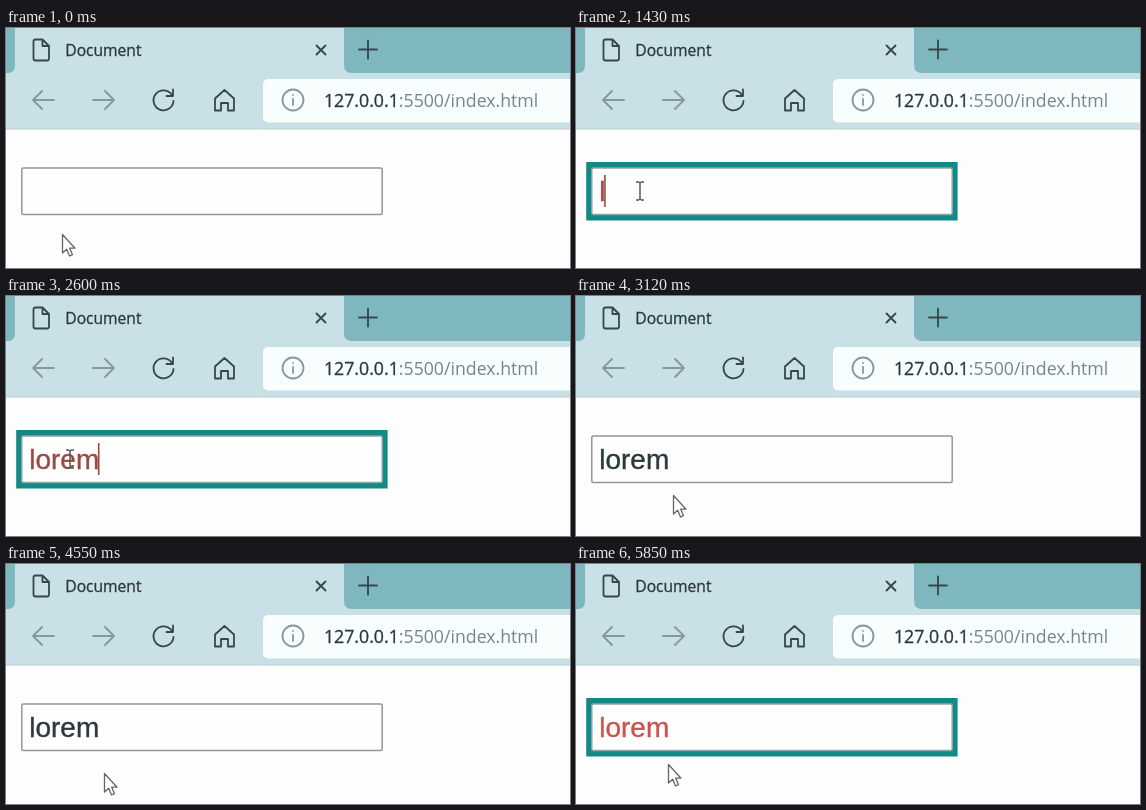
An HTML page that plays this animation: 564x240 px, repeating every 5980 ms.

```html
<!DOCTYPE html>
<html lang="en">
<head>
<meta charset="utf-8">
<style>
  html, body { margin: 0; width: 100%; height: 100%; overflow: hidden; background: #fdfdfe; }
  svg { display: block; }
  text { font-family: "Open Sans", "Noto Sans", sans-serif; white-space: pre; }
  .icon { fill: none; stroke: #34474c; stroke-width: 1.8; stroke-linecap: round; stroke-linejoin: round; }
  .dim { stroke: #87989d; }
  .ink { fill: #29383c; stroke: #29383c; stroke-width: .3; }
  #word { font: 28px "Liberation Sans", Arial, sans-serif; stroke-width: .4; }
</style>
</head>
<body>
<svg width="564" height="240" viewBox="0 0 564 240">
  <!-- tab strip and toolbar -->
  <rect width="564" height="101" fill="#c8e0e6"/>
  <path d="M0 0H9V37Q9 45 2 45H0Z M338 0H564V45H346Q338 45 338 37Z" fill="#7fb7bf"/>
  <path d="M0 101H564" stroke="#bccbd0"/>
  <rect x="257" y="51" width="330" height="43.500" rx="5" fill="#f8fdfe"/>

  <!-- tab -->
  <path class="icon" d="M29.500 11.500H36.500L43 18V30.500Q43 32.500 41 32.500H29.500Q27.500 32.500 27.500 30.500V13.500Q27.500 11.500 29.500 11.500Z M36.500 11.500V18H43"/>
  <text class="ink" x="59.300" y="28" font-size="15.600">Document</text>
  <path class="icon" d="M310.500 17.500L319.500 26.500M319.500 17.500L310.500 26.500"/>
  <path class="icon" d="M353 21.500H371M362 12.500V30.500"/>

  <!-- navigation -->
  <path id="back" class="icon dim" d="M48 72H27M36 63L27 72L36 81"/>
  <use href="#back" transform="translate(135) scale(-1 1)"/>
  <path class="icon" d="M166 67A10 10 0 1 0 167.500 73M167 61.500V68H160.500"/>
  <path class="icon" d="M209 70.500L218.500 62L228 70.500V82.500H222V75H215V82.500H209Z"/>
  <g class="icon dim">
    <circle cx="287" cy="72" r="10.500"/>
    <path d="M287 71V77M287 67V67.100"/>
  </g>
  <text class="ink" x="318" y="79" font-size="17.700">127.0.0.1<tspan fill="#78868a" stroke="none">:5500/index.html</tspan></text>

  <!-- input -->
  <rect id="ring" x="10.200" y="134" width="371.400" height="58.500" fill="#128985"/>
  <rect id="field" x="15.800" y="140" width="360.400" height="46.500" rx="1.500" fill="#fefefe" stroke-width="1.500"/>
  <text id="word" x="23.200" y="173"></text>
  <path id="caret" d="M0 147V179" stroke-width="1.600"/>

  <!-- pointers -->
  <path id="arrow" d="M.5 .5V19L4.700 15.200L7.500 22L10.500 20.700L7.700 14.200H13Z" fill="#fff" stroke="#62666b" stroke-width="1.300" stroke-linejoin="round"/>
  <path id="beam" d="M-4 -9H-1.500L0 -8L1.500 -9H4M0 -8V8M-4 9H-1.500L0 8L1.500 9H4" fill="none" stroke="#555b60" stroke-width="1.500"/>
</svg>
<script>
const LOOP = 5980, STEP = 130, MOVE = 300, CLICK = 450, BLINK = 520, TYPE = 1430;
const WORD = "lorem";
const $ = id => document.getElementById(id);

// The pointer alternates between outside and inside the field, clicking after each move.
const stops = [
  { at: -CLICK, x: 56, y: 206 },
  { at: 620, x: 64, y: 163 },
  { at: 2670, x: 97, y: 199 },
  { at: 3380, x: 103, y: 177 },
  { at: 4100, x: 98, y: 209 },
  { at: 4680, x: 101, y: 175 },
  { at: 5460, x: 92, y: 200 }
];

const ease = k => k * k * (3 - 2 * k);
const show = (id, on) => $(id).setAttribute("visibility", on ? "visible" : "hidden");
const set = (id, name, value) => $(id).setAttribute(name, value);

function draw(t) {
  const last = stops.findLastIndex(s => s.at <= t);
  const to = stops[last], from = stops[Math.max(0, last - 1)];
  const k = ease(Math.min(1, (t - to.at) / MOVE));
  const x = from.x + (to.x - from.x) * k, y = from.y + (to.y - from.y) * k;
  const hover = y < 187;

  const clicked = stops.findLastIndex(s => s.at + CLICK <= t);
  const focus = clicked % 2 === 1;
  const sinceClick = t - stops[clicked].at - CLICK;

  const letters = Math.floor((t - TYPE) / STEP) + 1;
  const typing = letters > 0 && letters <= WORD.length;
  const red = clicked === 1 ? "#9b4a43" : "#c9544d";
  const ink = focus ? red : "#2c393d";

  show("ring", focus);
  set("field", "stroke", focus ? "#8fa3a6" : hover ? "#6e7174" : "#939698");

  $("word").textContent = WORD.slice(0, Math.max(0, letters));
  set("word", "fill", ink);
  set("word", "stroke", ink);

  show("caret", focus && (typing || sinceClick % (2 * BLINK) < BLINK));
  set("caret", "stroke", red);
  set("caret", "transform", `translate(${22.7 + $("word").getComputedTextLength()})`);

  show("beam", hover);
  show("arrow", !hover);
  for (const id of ["beam", "arrow"]) set(id, "transform", `translate(${x} ${y})`);
}

set("back", "id", "back");
document.querySelector("use").setAttribute("class", "icon dim");

function tick() {
  draw(Math.floor((performance.now() % LOOP) / STEP) * STEP);
  requestAnimationFrame(tick);
}
tick();
</script>
</body>
</html>
```
